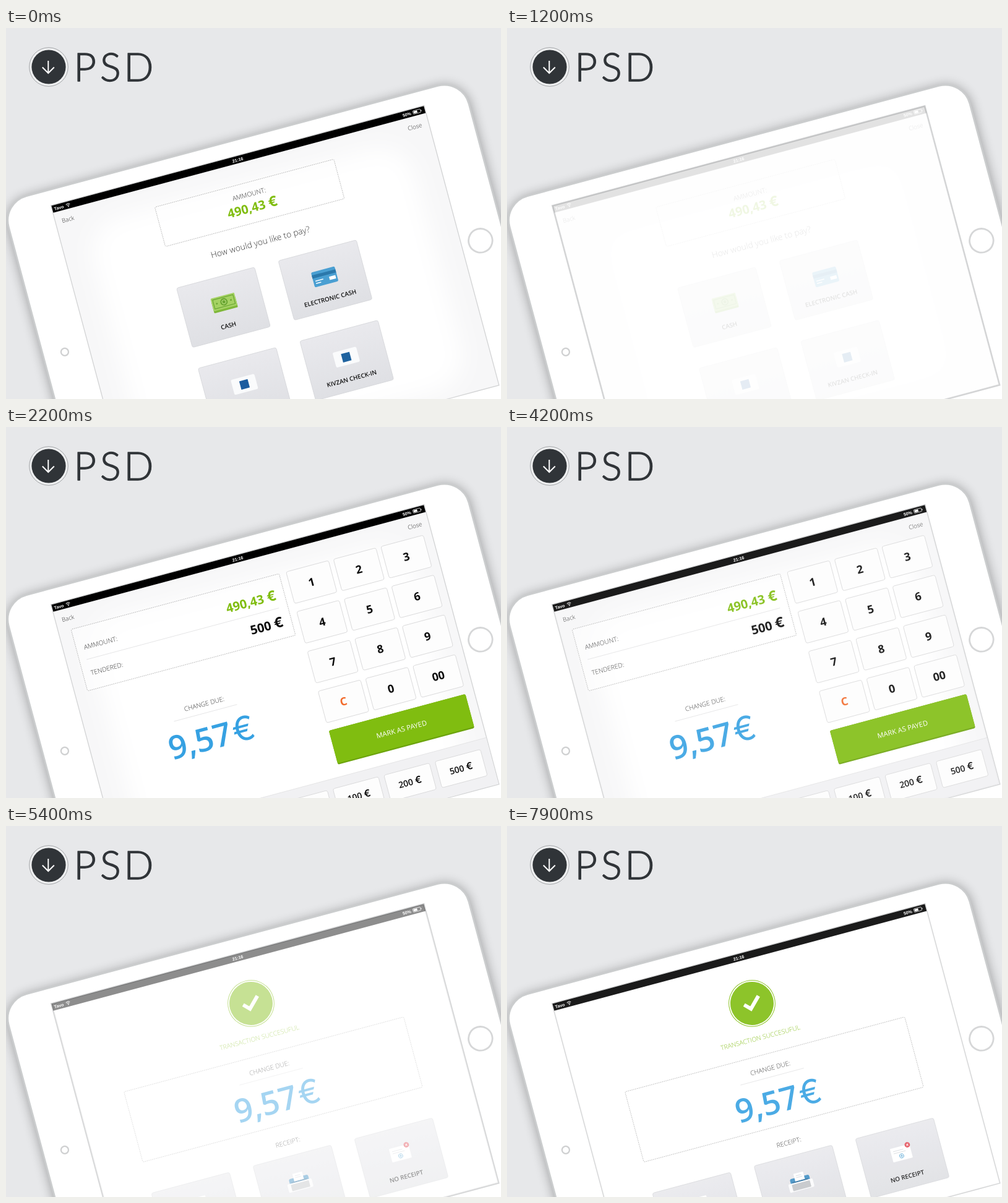
An HTML page that plays this animation: 800x600 px, repeating every 8 s.

```html
<!DOCTYPE html>
<html lang="en">
<head>
<meta charset="utf-8">
<title>Tablet payment flow</title>
<style>
  html, body { margin: 0; width: 100%; height: 100%; overflow: hidden; background: #e7e8ea; }
  svg { display: block; width: 800px; height: 600px; font-family: "Open Sans", "Noto Sans", sans-serif; }
  .title { font: 300 63px Lato, sans-serif; fill: #303438; stroke: #303438; stroke-width: 1.3; stroke-linejoin: round; }
  .status { font-family: "Liberation Sans", Arial, sans-serif; }
  .euro { font-family: Inter, "Open Sans", sans-serif; }
</style>
</head>
<body>
<svg id="stage" viewBox="0 0 800 600"></svg>
<script>
const GREEN = '#80bd10', BLUE = '#36a1e2', INK = '#333', W = 623, H = 467, MID = 312;

const rect = (x, y, w, h, fill, more = '') =>
  `<rect x="${x}" y="${y}" width="${w}" height="${h}" fill="${fill}" ${more}/>`;
const circle = (x, y, r, fill, more = '') =>
  `<circle cx="${x}" cy="${y}" r="${r}" fill="${fill}" ${more}/>`;
const path = (d, stroke, width, more = '') =>
  `<path d="${d}" fill="none" stroke="${stroke}" stroke-width="${width}" ${more}/>`;
const text = (x, y, str, size, weight = 300, fill = INK, anchor = 'middle', more = '') =>
  `<text x="${x}" y="${y}" font-size="${size}" font-weight="${weight}" fill="${fill}" text-anchor="${anchor}" ${more}>` +
  str.replace('€', `<tspan class="euro" font-size="${size * 1.14}">€</tspan>`) + '</text>';
const rule = (x1, x2, y) => path(`M${x1} ${y}H${x2}`, '#e2e2e3', 0.8);
const dashed = (x, y, w, h) =>
  rect(x, y, w, h, '#fff', 'fill-opacity=".6" rx="2" stroke="#9a9a9a" stroke-width=".7" stroke-dasharray="1.6 1.4"');
const tile = (x, y, label, icon) =>
  `<g transform="translate(${x} ${y})">` +
  rect(0, 0, 130.5, 99.5, 'url(#tile)', 'rx="3" stroke="#d5d6da" stroke-width=".8"') +
  icon + text(65.4, 83.8, label, 9.8, 600, '#111') + '</g>';
const key = (x, y, w, h, label, size, weight, fill = '#0c0c0c') =>
  rect(x, y, w, h, '#fdfdfd', 'rx="3" stroke="#dadadb" stroke-width=".9"') +
  text(x + w / 2, y + h / 2 + size * 0.36, label, size, weight, fill);
const bigSum = (x, y) =>
  `<text x="${x}" y="${y}" font-size="52.5" font-weight="600" fill="${BLUE}">9,57` +
  '<tspan class="euro" dx="2.5" font-size="54" font-weight="400">€</tspan></text>';

// Parts shared by the screens
const tint = rect(0, 0, W, H, '#f7f7f8') + rect(42, 45, W - 84, H - 60, '#fff', 'rx="60" filter="url(#soft)"');
const statusBar = rect(0, 0, W, 11.8, '#000') + '<g class="status">' +
  text(3, 8.6, 'Tavo', 7, 700, '#fff', 'start') +
  text(310, 8.8, '21:16', 7, 700, '#fff') +
  text(600, 8.6, '50%', 7, 700, '#fff', 'end') + '</g>' +
  path('M23 5Q26.3 1.8 29.6 5M24.4 6.6Q26.3 4.9 28.2 6.6', '#fff', 1) + circle(26.3, 8.2, 0.9, '#fff') +
  rect(603.5, 3, 12.5, 5.6, 'none', 'rx="1" stroke="#fff" stroke-width=".7"') +
  rect(604.5, 4, 6, 3.6, '#fff') + rect(616.6, 4.8, 1, 2, '#fff');
const nav = text(10, 31.5, 'Back', 9.6, 300, INK, 'start') + text(612, 32, 'Close', 9.6, 300, INK, 'end');

// Icons, placed within a tile
const billIcon = rect(48.5, 37, 39.5, 18.5, '#7fb83a', 'rx="1.5"') +
  rect(48.5, 31, 39.5, 21, '#a5d263', 'rx="1.5"') +
  rect(51.3, 33.8, 34, 15, 'none', 'stroke="#6aa632" stroke-width="1.2"') +
  circle(68.3, 41.3, 6, '#6aa632') + circle(68.3, 41.3, 3.2, 'none', 'stroke="#b5dc7c" stroke-width="1.2"') +
  circle(56.5, 41.3, 1.4, '#6aa632') + circle(80, 41.3, 1.4, '#6aa632');
const cardIcon = rect(46, 32, 39.5, 25, '#4a9fd2', 'rx="2.5"') + rect(46, 37, 39.5, 5.2, '#2b78ab') +
  rect(72.5, 46, 10.5, 5.6, '#fff') + path('M49.5 47.3h13M49.5 51.3h8.5', '#fff', 1.5);
const brandCard = color => rect(46, 32, 39.5, 25, '#fafbfc', 'rx="2.5"') + rect(58.8, 37.5, 14, 14, color);
const paperIcon = rect(50, 25.5, 33, 27.5, '#fff', 'rx="1"');
const printerIcon = rect(50, 36, 32, 10, '#3f8fc4', 'rx="3"') + rect(58, 29, 16, 13, '#fff') +
  path('M61 33h9M61 36h10', '#cfd3d8', 0.8) + path('M53 42.5h26', '#2b6c9c', 2) +
  rect(45.5, 43.5, 40.5, 14, '#fbfbfc', 'rx="2"') + rect(51, 45.5, 30, 10.5, '#c3c5c9', 'rx="1"');
const noReceiptIcon = rect(49.5, 30.5, 32.5, 22.5, '#fff', 'rx="1"') +
  path('M53.5 36h17M53.5 39.5h20', '#d3d6da', 0.8) +
  circle(65.2, 46, 3.3, 'none', 'stroke="#4a9fd2" stroke-width=".9"') + path('M65.2 44v4M63.2 46h4', '#4a9fd2', 0.8) +
  circle(78.5, 31, 4.4, '#e4505a') + path('M76.9 29.4l3.2 3.2m0-3.2l-3.2 3.2', '#fff', 1);

const payScreen = tint + statusBar + nav + dashed(160.8, 45.5, 299.5, 66) +
  text(313.3, 68.5, 'AMMOUNT:', 10.5) + text(313.5, 93.9, '490,43 €', 20, 700, GREEN) +
  text(311, 149, 'How would you like to pay?', 13.7) +
  tile(160.8, 181, 'CASH', billIcon) + tile(331.1, 181, 'ELECTRONIC CASH', cardIcon) +
  tile(160.8, 315.4, '', brandCard('#1c5c9f')) + tile(331.1, 315.4, 'KIVZAN CHECK-IN', brandCard('#1f639f'));

const keys = ['1', '2', '3', '4', '5', '6', '7', '8', '9', 'C', '0', '00'];
const cashScreen = tint + rect(0, 389.5, W, H - 389.5, '#f1f1f3') + rule(0, W, 389.5) + statusBar + nav +
  dashed(20.3, 46.8, 348, 103) + rule(32, 354, 100.3) +
  text(33, 84, 'AMMOUNT:', 10.5, 300, INK, 'start') + text(354.8, 86.5, '490,43 €', 20, 700, GREEN, 'end') +
  text(33, 126.8, 'TENDERED:', 10.4, 300, INK, 'start') + text(355, 130.8, '500 €', 20, 700, '#0c0c0c', 'end') +
  text(197, 222.6, 'CHANGE DUE:', 10.4) + rule(142.5, 248, 233.5) + bigSum(123.2, 293.3) +
  keys.map((k, i) => key(380 + i % 3 * 79.3, 46.9 + Math.floor(i / 3) * 66.6, 71, 53, k, 18, 700,
    k === 'C' ? '#f26b2c' : '#0c0c0c')).join('') +
  rect(380.4, 312.8, 228.4, 56.8, '#6ba30c', 'rx="2.5"') + rect(380.4, 312.8, 228.4, 54.6, GREEN, 'rx="2.5"') +
  text(494.4, 345.2, 'MARK AS PAYED', 11.3, 500, '#fff') +
  ['50 €', '100 €', '200 €', '500 €'].map((s, i) => key(276.9 + i * 85.4, 405.4, 76, 44, s, 14, 600)).join('');

const doneScreen = rect(0, 0, W, H, '#fff') + statusBar +
  circle(311.7, 83, 37.3, '#fff', `stroke="${GREEN}" stroke-width="1"`) + circle(311.7, 83, 35, GREEN) +
  path('M298.8 82L307.8 91L324.8 74', '#fff', 6) +
  text(310.6, 143.6, 'TRANSACTION SUCCESUFUL', 10.4, 300, GREEN) + dashed(76.4, 168, 468, 117.6) +
  text(313, 195.4, 'CHANGE DUE:', 10.4) + rule(259.5, 365.5, 205.8) + bigSum(240.7, 265) +
  text(311, 319.2, 'RECEIPT:', 10.4) +
  tile(76.8, 337.8, '', paperIcon) + tile(246.8, 337.8, '', printerIcon) + tile(416.4, 337.8, 'NO RECEIPT', noReceiptIcon);

const stage = document.getElementById('stage');
stage.innerHTML = `
  <defs>
    <linearGradient id="tile" x2="0" y2="1"><stop stop-color="#e9e9ed"/><stop offset="1" stop-color="#dfe0e4"/></linearGradient>
    <filter id="soft"><feGaussianBlur stdDeviation="18"/></filter>
    <filter id="shade" x="-10%" y="-10%" width="120%" height="120%"><feGaussianBlur stdDeviation="9"/></filter>
  </defs>` +
  rect(0, 0, 800, 600, '#e7e8ea') +
  circle(69, 63, 31.3, '#eeeff0', 'stroke="#a3a5a8" stroke-width="1"') + circle(69, 63, 27.6, '#303438') +
  path('M68.3 53V72.5M58.8 63.5L68.3 73L77.8 63.5', '#fff', 2) +
  '<text class="title" x="109.5 152 190.5" y="85.5">PSD</text>' +
  '<g transform="translate(73.4 287.4) rotate(-15)">' +
  rect(-77, -25, 773, 520, '#000', 'rx="42" opacity=".33" filter="url(#shade)"') +
  rect(-75.7, -25.7, 770, 518.5, '#fff', 'rx="41" stroke="#cbcdce" stroke-width="2.8"') +
  circle(655.2, 234, 19.3, '#fff', 'stroke="#d6d7d8" stroke-width="2.8"') +
  circle(-40.4, 234, 6, '#fff', 'stroke="#cfd0d1" stroke-width="2.3"') +
  rect(0, 0, W, H, '#fff', 'stroke="#d2d3d4" stroke-width="2.6"') +
  [payScreen, cashScreen, doneScreen].map(s => `<g class="screen">${s}</g>`).join('') + '</g>';

const screens = stage.querySelectorAll('.screen');

// Fades advance in nine steps of 100 ms
const fade = (t, start) => Math.max(0, Math.min(9, Math.floor((t - start) / 100) + 1)) / 9;

function draw(now) {
  const t = now % 8000;
  const alpha = [1 - fade(t, 500), fade(t, 1400) - fade(t, 4200), fade(t, 5100) - fade(t, 7900)];
  screens.forEach((s, i) => s.setAttribute('opacity', alpha[i]));
}

let begin;
function tick(now) {
  begin ??= now;
  draw(now - begin);
  requestAnimationFrame(tick);
}
draw(0);
requestAnimationFrame(tick);
</script>
</body>
</html>
```
